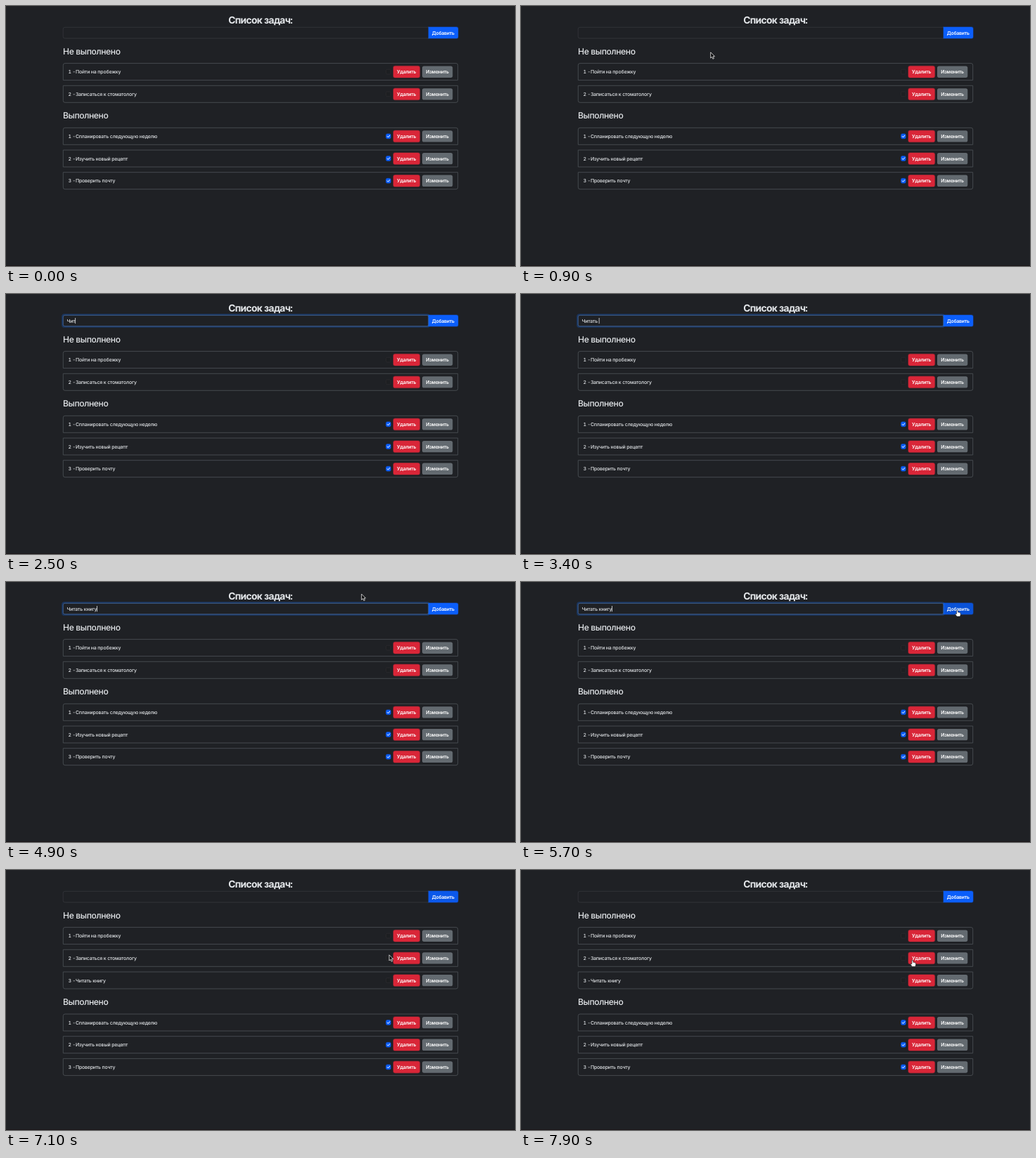
An HTML page for the animation above (8000 ms loop, 724x370 px).

```html
<!DOCTYPE html>
<html lang="ru">
<head>
<meta charset="utf-8">
<title>Список задач</title>
<style>
  html, body { margin: 0; width: 100%; height: 100%; overflow: hidden; background: #1f2125; }
  svg { display: block; width: 724px; height: 370px; }
  text {
    font: 500 6.94px Inter, "Open Sans", sans-serif;
    font-variant-numeric: tabular-nums;
    letter-spacing: -.025em; fill: #e3e6e9;
    white-space: pre; text-rendering: geometricPrecision;
  }
  .title { font-size: 13.88px; font-weight: 700; letter-spacing: -.052em; text-anchor: middle; }
  .heading { font-size: 12.14px; letter-spacing: -.031em; }
  .label { font-weight: 600; letter-spacing: -.035em; fill: #fff; text-anchor: middle; }
  .halo { stroke-width: 1.4; stroke-opacity: .4; paint-order: stroke; }
</style>
</head>
<body>
<svg id="stage" viewBox="0 0 724 370" xmlns="http://www.w3.org/2000/svg"></svg>
<script>
const LOOP = 8000;
const PITCH = 31.7;
const FIRST_ROW = 81.6;
const DONE_TOP = 173.3;
const BLUE = [11, 94, 250];
const BLUE_HOVER = [10, 82, 215];
const ADD_TIME = 5900;
const DRAFT = 'Читать книгу';
const KEY_TIMES = [2000, 2300, 2500, 2800, 3000, 3200, 3400, 3800, 3900, 4100, 4200, 4500];
const CARET_OFF = [[1800, 2000], [5000, 5500]];

// time, x, y of the pointer's hot spot; each run is one visible stretch
const POINTER_RUNS = [
  [[300, 629, 250], [600, 500, 182], [900, 270, 66], [1100, 214, 37], [2000, 214, 37]],
  [[4800, 501, 19], [4900, 505.5, 17], [5200, 575, 53], [5600, 620.6, 40], [7000, 620.6, 40],
   [7200, 471, 200], [7450, 471, 200], [7900, 556.9, 128.3], [8000, 556.9, 128.3]]
];

const stage = document.getElementById('stage');

function add(parent, tag, attrs = {}, content) {
  const node = document.createElementNS('http://www.w3.org/2000/svg', tag);
  for (const key in attrs) node.setAttribute(key, attrs[key]);
  if (content !== undefined) node.textContent = content;
  return parent.appendChild(node);
}

const show = (node, visible) => node.setAttribute('visibility', visible ? 'visible' : 'hidden');
const ramp = (t, start, length) => Math.min(1, Math.max(0, (t - start) / length));
const mix = (a, b, k) => a + (b - a) * k;
const mixColor = (a, b, k) => `rgb(${a.map((v, i) => Math.round(mix(v, b[i], k)))})`;

function framePath(roundTop, roundBottom) {
  const a = roundTop ? 2.6 : 0, b = roundBottom ? 2.6 : 0;
  return `M81.3 ${a}q0 ${-a} ${a} ${-a}H${642.7 - a}q${a} 0 ${a} ${a}V${24 - b}` +
    `q0 ${b} ${-b} ${b}H${81.3 + b}q${-b} 0 ${-b} ${-b}Z`;
}

function button(parent, x, width, fill, label, halo = 'none') {
  add(parent, 'rect', { class: 'halo', x, y: 3.9, width, height: 16.4, rx: 2.6, fill, stroke: halo });
  add(parent, 'text', { class: 'label', x: x + width / 2 - .1, y: 14.7 }, label);
}

function taskRow(parent, y, label, checked, roundTop, roundBottom) {
  const row = add(parent, 'g', { transform: `translate(0 ${y})` });
  const frame = add(row, 'path', {
    d: framePath(roundTop, roundBottom), fill: 'none', stroke: '#4a4e53', 'stroke-width': .9
  });
  add(row, 'text', { x: 88.6, y: 14.7 }, label);
  add(row, 'rect', {
    x: 540.6, y: 8.6, width: 6.6, height: 6.8, rx: 1.6,
    fill: checked ? '#0b5efa' : '#1d1f22', stroke: checked ? '#0b52d6' : '#2e2d31', 'stroke-width': .7
  });
  if (checked) add(row, 'path', {
    d: 'M542.2 12.1l1.3 1.4l2.3-2.7', fill: 'none', stroke: '#fff', 'stroke-width': 1,
    'stroke-linecap': 'round', 'stroke-linejoin': 'round'
  });
  button(row, 551, 37.5, '#d92638', 'Удалить', '#d92638');
  button(row, 592, 43.3, '#636a70', 'Изменить');
  return { row, frame };
}

add(stage, 'rect', { width: 724, height: 370, fill: '#1f2125' });
add(stage, 'rect', { y: 369, width: 724, height: 1, fill: '#1b1518' });
add(stage, 'text', { class: 'title', x: 361.8, y: 25.1 }, 'Список задач:');

// Input and its button
add(stage, 'path', {
  d: 'M601 30.3H83.8q-2.6 0-2.6 2.6V43.4q0 2.6 2.6 2.6H601', fill: 'none', stroke: '#35383d', 'stroke-width': .8
});
const addButton = add(stage, 'path', {
  class: 'halo', d: 'M601 30H640.4q2.6 0 2.6 2.6V43.4q0 2.6-2.6 2.6H601Z', stroke: '#0b5efa'
});
add(stage, 'text', { class: 'label', x: 621.8, y: 40.7 }, 'Добавить');
const focus = add(stage, 'g', { fill: 'none' });
add(focus, 'rect', { x: 80.1, y: 29.1, width: 521.8, height: 17.8, rx: 3, stroke: '#0d6efd', 'stroke-width': 1.8, 'stroke-opacity': .27 });
add(focus, 'rect', { x: 81.3, y: 30.3, width: 519.6, height: 15.5, rx: 2.4, stroke: '#446aa6', 'stroke-width': .7 });
const draft = add(stage, 'text', { x: 86.5, y: 40.7 });
const caret = add(stage, 'rect', { y: 34, width: .8, height: 8.2, fill: '#e3e6e9' });

// Lists
add(stage, 'text', { class: 'heading', x: 81, y: 68.5 }, 'Не выполнено');
const open = ['1 -Пойти на пробежку', '2 -Записаться к стоматологу', '3 -' + DRAFT]
  .map((label, i) => taskRow(stage, FIRST_ROW + i * PITCH, label, false, i === 0, i === 2));
const done = add(stage, 'g');
add(done, 'text', { class: 'heading', x: 81, y: 160.1 }, 'Выполнено');
['1 -Спланировать следующую неделю', '2 -Изучить новый рецепт', '3 -Проверить почту']
  .forEach((label, i) => taskRow(done, DONE_TOP + i * PITCH, label, true, i === 0, i === 2));

// Pointers, drawn with the hot spot at the origin
const pointers = {
  arrow: add(stage, 'path', {
    d: 'M0 0V8.2L1.9 6.5L3.2 9.4L4.7 8.8L3.4 5.9H5.8Z',
    fill: '#08090a', stroke: '#f2f2f2', 'stroke-width': .8, 'stroke-linejoin': 'round'
  }),
  hand: add(stage, 'path', {
    d: 'M-1 .6Q0-.6 .9 .6V3.1Q1.9 2.6 2.4 3.4Q3.3 3 3.7 3.8Q4.6 3.6 4.7 4.7V6.6L4 9.1H-.7L-2.8 5.9Q-2.9 4.5-1 5.5Z',
    fill: '#fff', stroke: '#101114', 'stroke-width': .6, 'stroke-linejoin': 'round'
  }),
  beam: add(stage, 'g', { fill: 'none', 'stroke-linecap': 'round' })
};
for (const [stroke, width] of [['#f2f2f2', 1.9], ['#08090a', .7]])
  add(pointers.beam, 'path', {
    d: 'M-2-4.3Q0-4.3 0-2.8Q0-4.3 2-4.3M0-2.8V2.8M-2 4.3Q0 4.3 0 2.8Q0 4.3 2 4.3M-1 .8H1',
    stroke, 'stroke-width': width
  });

function pointerAt(t) {
  const run = POINTER_RUNS.find(r => t >= r[0][0] && t < r[r.length - 1][0]);
  if (!run) return null;
  const i = run.findIndex(p => p[0] > t);
  const [t0, x0, y0] = run[i - 1], [t1, x1, y1] = run[i];
  const k = (t - t0) / (t1 - t0);
  return [mix(x0, x1, k), mix(y0, y1, k)];
}

function pointerKind([x, y], added) {
  if (y > 30 && y < 46 && x > 81 && x < 643) return x < 601 ? 'beam' : 'hand';
  const overButton = (x > 551 && x < 588.5) || (x > 592 && x < 635.3);
  const doneTop = DONE_TOP + (added ? PITCH : 0);
  const inRow = (top, count) => {
    const offset = y - top;
    return offset > 0 && offset < count * PITCH && offset % PITCH > 3.9 && offset % PITCH < 20.3;
  };
  return overButton && (inRow(FIRST_ROW, added ? 3 : 2) || inRow(doneTop, 3)) ? 'hand' : 'arrow';
}

function render(t) {
  const added = t >= ADD_TIME;
  const focused = t >= 1250 && t < 5800;

  show(open[2].row, added);
  open[1].frame.setAttribute('d', framePath(false, !added));
  done.setAttribute('transform', `translate(0 ${added ? PITCH : 0})`);

  draft.textContent = added ? '' : DRAFT.slice(0, KEY_TIMES.filter(k => k <= t).length);
  const typedWidth = draft.textContent ? draft.getComputedTextLength() : 0;
  caret.setAttribute('x', 86.4 + typedWidth);
  show(caret, focused && !CARET_OFF.some(([from, to]) => t >= from && t < to));
  focus.setAttribute('opacity', ramp(t, 1250, 150) - ramp(t, 5800, 150));

  const hover = ramp(t, 5420, 150) - ramp(t, 7020, 150);
  addButton.setAttribute('fill', mixColor(BLUE, BLUE_HOVER, hover));

  const spot = pointerAt(t);
  const kind = spot && pointerKind(spot, added);
  for (const name in pointers) {
    show(pointers[name], name === kind);
    if (name === kind) pointers[name].setAttribute('transform', `translate(${spot})`);
  }
}

const start = performance.now();
function tick() {
  render((performance.now() - start) % LOOP);
  requestAnimationFrame(tick);
}
tick();
</script>
</body>
</html>
```
